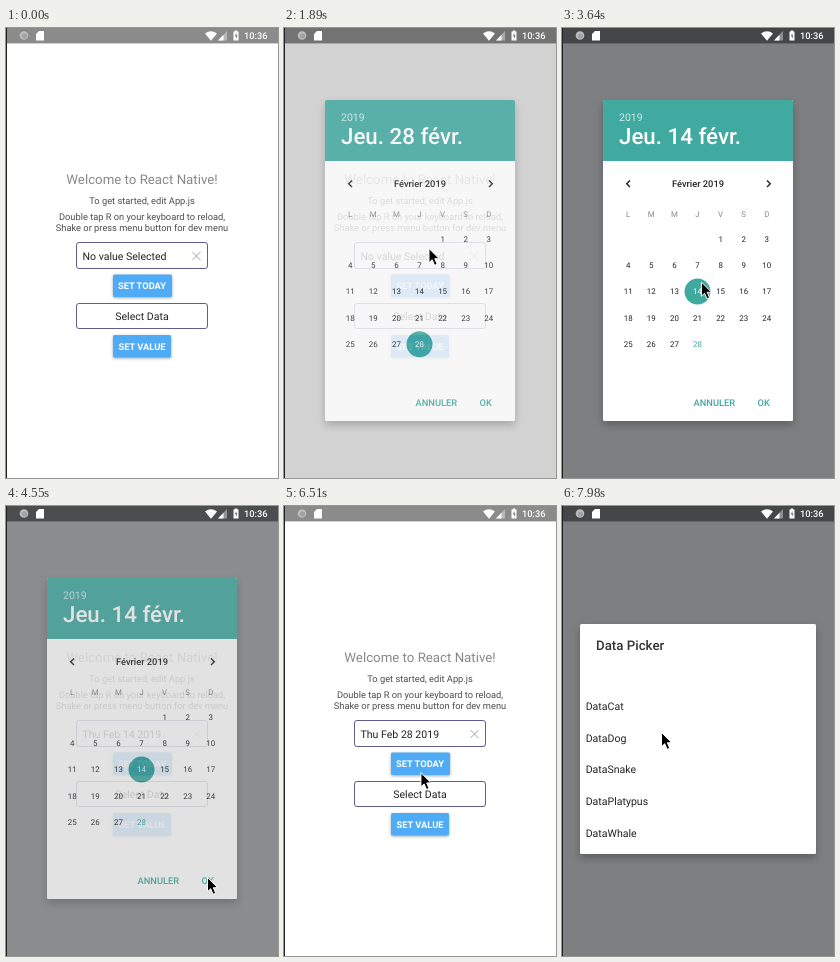
An HTML page that plays this animation: 272x450 px, repeating every 8 s.

```html
<!DOCTYPE html>
<html lang="en">
<head>
<meta charset="utf-8">
<title>Date and data pickers</title>
<style>
  html, body { margin: 0; width: 100%; height: 100%; overflow: hidden; background: #fff; }
  svg { display: block; width: 272px; height: 450px; }
  text { font-family: Roboto, sans-serif; text-rendering: geometricPrecision; white-space: pre; }
  .panel { filter: drop-shadow(0 4px 4px rgba(0, 0, 0, .25)); }
  .button { filter: drop-shadow(0 1px 1.5px rgba(60, 80, 100, .5)); }
</style>
</head>
<body>
<svg viewBox="0 0 272 450" xmlns="http://www.w3.org/2000/svg">
  <rect width="272" height="450" fill="#fff"/>
  <rect width="272" height="15.400" fill="#8b8b8b"/>
  <g id="page">
    <g fill="#fff" stroke="#605e8e">
      <rect x="70.500" y="214.500" width="131" height="26" rx="2.500"/>
      <rect x="70.500" y="275.500" width="131" height="25" rx="2.500"/>
    </g>
    <path d="M186.500 224l8 8m0-8l-8 8" stroke="#999" stroke-width=".9"/>
    <g class="button" fill="#50abf6">
      <rect x="107" y="246.500" width="59" height="22.500" rx="1.500"/>
      <rect x="107" y="307" width="58" height="22.500" rx="1.500"/>
    </g>
  </g>
  <rect id="dim" width="272" height="450" fill="#000406"/>
  <g id="calendar">
    <rect class="panel" x="41" y="72" width="190" height="321" rx="1.500" fill="#fff"/>
    <path d="M41 133V73.500q0-1.500 1.500-1.500H229.500q1.500 0 1.500 1.500V133z" fill="#40a9a0"/>
    <path d="M68 152.500l-3.300 3.300 3.300 3.300M205 152.500l3.300 3.300-3.300 3.300" fill="none" stroke="#222" stroke-width="1.400"/>
    <circle id="mark" cx="135.500" r="13" fill="#40a9a0"/>
  </g>
  <g id="list">
    <rect class="panel" x="18" y="118" width="236" height="230" rx="1.500" fill="#fff"/>
  </g>
  <g id="status" fill="#fff">
    <circle cx="18" cy="7.500" r="4.300" fill="#bcbcbc"/>
    <circle cx="18.500" cy="8" r="2.600" fill="#a2a2a2"/>
    <path d="M33 3h5v9.500h-8V6zM199 5.500q6-4.600 12 0l-6 7.200zM227.500 3.500h1.300v-1h2.400v1h1.300v9h-5z"/>
    <path d="M221 3v9.500h-9z" opacity=".4"/>
    <path d="M217.500 6.700v5.800H212z"/>
    <path d="M230.500 5l-1.800 3.300h1.200v2.700l1.700-3.500h-1.100z" fill="#777"/>
  </g>
  <circle id="ring" r="21.500" fill="none" stroke="#777" stroke-opacity=".5"/>
  <path id="cursor" d="M.5.5v14.200l3.200-3 2.400 5.600 2.600-1.100-2.400-5.500h4.400z" stroke="#fff"/>
  <path d="M.5 0V450" stroke="#222"/>
</svg>
<script>
const $ = id => document.getElementById(id);
const TEAL = '#40a9a0', INK = '#222', GREY = '#4c4c4c';
const SMALL = 7.9, BODY = 9.3, INPUT = 10.56, TITLE = 13.28;
const STEP = 70, LOOP = 8000;

function set(id, attrs) {
  const el = typeof id === 'string' ? $(id) : id;
  for (const name in attrs) el.setAttribute(name, attrs[name]);
  return el;
}

function label(parent, str, x, y, size, fill, anchor = 'start', weight = 400) {
  const el = document.createElementNS('http://www.w3.org/2000/svg', 'text');
  set(el, { x, y, fill, 'font-size': size, 'text-anchor': anchor, 'font-weight': weight });
  el.textContent = str;
  $(parent).append(el);
  return el;
}

// Main page
label('page', 'Welcome to React Native!', 136, 156, TITLE, '#888', 'middle');
label('page', 'To get started, edit App.js', 136, 176.3, BODY, GREY, 'middle');
label('page', 'Double tap R on your keyboard to reload,', 136, 192.2, BODY, GREY, 'middle');
label('page', 'Shake or press menu button for dev menu', 136, 203.1, BODY, GREY, 'middle');
const value = label('page', '', 76.5, 232, INPUT, INK);
label('page', 'SET TODAY', 136, 261.1, BODY, '#fff', 'middle', 700);
label('page', 'Select Data', 136, 292, INPUT, INK, 'middle');
label('page', 'SET VALUE', 136, 321.6, BODY, '#fff', 'middle', 700);
label('status', '10:36', 238, 11, BODY, '#fff', 'start', 500);

// Date dialog
const column = i => 66.2 + i * 23.1;
const row = i => 211 + i * 26.3;
label('calendar', '2019', 57, 92.5, INPUT, '#cfeae7');
const heading = label('calendar', '', 57, 116, 22.3, '#fff', 'start', 500);
label('calendar', 'Février 2019', 136, 159, BODY, INK, 'middle', 500);
[...'LMMJVSD'].forEach((d, i) => label('calendar', d, column(i), 188.7, SMALL, '#888', 'middle'));
const weekOf = d => Math.floor((d + 3) / 7);
const days = [];
for (let d = 1; d <= 28; d++)
  days[d] = label('calendar', d, column((d + 3) % 7), row(weekOf(d)) + 2.8, SMALL, INK, 'middle');
label('calendar', 'ANNULER', 131.5, 378, BODY, TEAL, 'start', 500);
label('calendar', 'OK', 195.5, 378, BODY, TEAL, 'start', 500);

// Data dialog
label('list', 'Data Picker', 34, 143.5, TITLE, '#333', 'start', 500);
['Cat', 'Dog', 'Snake', 'Platypus', 'Whale'].forEach((name, i) =>
  label('list', 'Data' + name, 23.7, 204.2 + i * 31.6, INPUT, INK));

const clicks = { field: 1260, day: 2870, ok: 4340, today: 5740, select: 6860 };

// Pointer moves: start, duration, destination
const moves = [
  [0, 350, 150, 4], [350, 350, 144.5, 220],
  [2240, 140, 129, 251], [2380, 350, 137, 264],
  [3570, 420, 165, 108], [3990, 350, 201, 371],
  [4900, 210, 139.5, 250], [5110, 420, 136, 261],
  [6440, 280, 139, 296.5], [7630, 350, 99, 226]
];

const ramp = (t, start, length) => Math.min(1, Math.max(0, (t - start) / length));
const smooth = k => (1 - Math.cos(Math.PI * k)) / 2;
const easeOut = k => 1 - (1 - k) ** 3.4;

function pointerAt(t) {
  let x = 216, y = 417;
  for (const [start, length, toX, toY] of moves) {
    const k = smooth(ramp(t, start, length));
    x += (toX - x) * k;
    y += (toY - y) * k;
  }
  return `translate(${x} ${y})`;
}

function draw(now) {
  const t = Math.floor(now % LOOP / STEP) * STEP;

  const dateIn = ramp(t, clicks.field + 490, 350);
  const dateOut = ramp(t, clicks.ok + 70, 420);
  const listIn = ramp(t, clicks.select + 280, 210);
  set('calendar', { opacity: easeOut(dateIn) * (1 - smooth(dateOut)) });
  set('list', { opacity: easeOut(listIn) });
  set('dim', { opacity: .51 * (smooth(dateIn) * (1 - dateOut ** 2) + smooth(listIn)) });

  const chosen = t > clicks.day ? 14 : 28;
  heading.textContent = `Jeu. ${chosen} févr.`;
  set('mark', { cy: row(weekOf(chosen)) });
  set(days[14], { fill: chosen === 14 ? '#fff' : INK });
  set(days[28], { fill: chosen === 28 ? '#fff' : TEAL });
  value.textContent = t > clicks.today + STEP ? 'Thu Feb 28 2019'
    : t > clicks.ok + STEP ? 'Thu Feb 14 2019' : 'No value Selected';

  const transform = pointerAt(t);
  set('cursor', { transform, visibility: t ? 'visible' : 'hidden' });
  set('ring', { transform, visibility: Object.values(clicks).includes(t) ? 'visible' : 'hidden' });
}

function loop() {
  draw(performance.now());
  requestAnimationFrame(loop);
}
loop();
</script>
</body>
</html>
```
